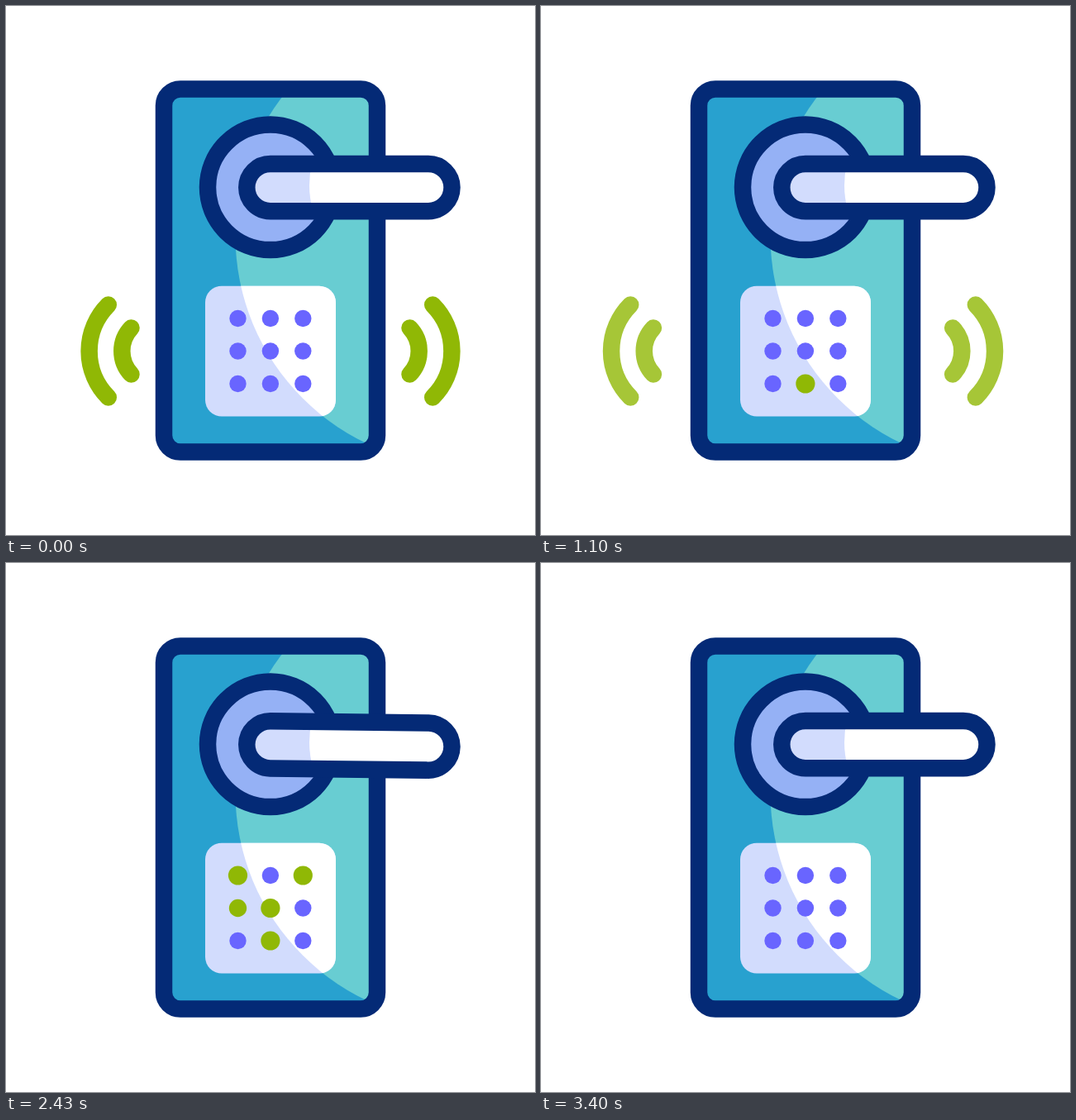
These frames come from a looping animation (640x640 px, 3.43 s). An HTML page:

```html
<!DOCTYPE html>
<html lang="en">
<head>
<meta charset="utf-8">
<title>Smart door lock</title>
<style>
  html, body { margin: 0; width: 100%; height: 100%; overflow: hidden; background: #fff; }
  svg { display: block; width: 100vw; height: 100vh; }
  .line { fill: none; stroke: #042a76; stroke-width: 20.5; }
  .wave { fill: none; stroke: #90b805; stroke-width: 20.5; stroke-linecap: round; }
</style>
</head>
<body>
<svg viewBox="0 0 640 640">
  <defs>
    <clipPath id="plateClip"><rect x="191" y="100.5" width="258" height="439" rx="20"/></clipPath>
    <clipPath id="padClip"><rect x="241" y="338.7" width="158" height="157.8" rx="20"/></clipPath>
    <clipPath id="handleClip"><rect class="turn" x="291.3" y="191" width="248.2" height="57.2" rx="28.6"/></clipPath>
  </defs>

  <g id="left" class="wave">
    <path d="M123.8 361.5A79.2 79.2 0 0 0 123.8 473.5M151.5 389.5A40.6 40.6 0 0 0 151.5 445.5"/>
  </g>
  <g id="right" class="wave">
    <path d="M516.2 361.5A79.2 79.2 0 0 1 516.2 473.5M488.5 389.5A40.6 40.6 0 0 1 488.5 445.5"/>
  </g>

  <g clip-path="url(#plateClip)">
    <rect x="191" y="100" width="258" height="440" fill="#28a1cf"/>
    <circle cx="555.5" cy="278" r="278" fill="#68cdd2"/>
  </g>
  <rect class="line" x="191" y="100.5" width="258" height="439" rx="20"/>

  <g clip-path="url(#padClip)">
    <rect x="241" y="338" width="158" height="160" fill="#d2dcfd"/>
    <circle cx="555.5" cy="278" r="278" fill="#fff"/>
  </g>
  <g id="dots"></g>

  <circle cx="319.8" cy="219.3" r="75.8" fill="#95b1f5"/>
  <circle class="line" cx="319.8" cy="219.3" r="75.8"/>

  <g clip-path="url(#handleClip)">
    <rect x="260" y="150" width="320" height="260" fill="#d2dcfd"/>
    <ellipse cx="627" cy="217" rx="260" ry="169" fill="#fff"/>
  </g>
  <rect class="line turn" x="291.3" y="191" width="248.2" height="57.2" rx="28.6"/>
</svg>
<script>
const LOOP = 3430, FPS = 30;
const PURPLE = [105, 101, 255], GREEN = [144, 184, 5];
const WAVE_STARTS = [0, 25, 51, 77];
const FLASH = [72, 80];
// Key presses: column, row, first lit step, first unlit step
const PRESSES = [[1, 1, 17, 23], [1, 2, 31, 38], [2, 0, 45, 51], [0, 0, 59, 65], [0, 1, 73, 80]];

const byId = id => document.getElementById(id);
const left = byId('left'), right = byId('right');
const turning = document.querySelectorAll('.turn');

const dots = Array.from({ length: 9 }, (_, i) => {
  const dot = document.createElementNS('http://www.w3.org/2000/svg', 'circle');
  dot.setAttribute('cx', 280.5 + 39.4 * (i % 3));
  dot.setAttribute('cy', 378 + 39.5 * Math.floor(i / 3));
  byId('dots').append(dot);
  return dot;
});

const clamp = x => Math.min(1, Math.max(0, x));
const ease = (x, from, to) => {
  const u = clamp((x - from) / (to - from));
  return u * u * (3 - 2 * u);
};
const mix = k => `rgb(${PURPLE.map((c, i) => Math.round(c + (GREEN[i] - c) * k))})`;
const within = (x, [from, to]) => x >= from && x < to;

function drawWaves(step) {
  const age = step - WAVE_STARTS.filter(s => s <= step).pop();
  const push = ease(age, 0, 12);
  left.setAttribute('transform', `translate(${-21 * push} 0)`);
  right.setAttribute('transform', `translate(${13 * push} 0)`);
  for (const side of [left, right]) side.setAttribute('opacity', 1 - ease(age, 6, 13));
}

function drawDots(step) {
  dots.forEach((dot, i) => {
    const press = PRESSES.find(([col, row]) => col + 3 * row === i);
    let tint = 0, grow = 0;
    if (press) {
      const [, , on, off] = press;
      const last = on > FLASH[0];
      if (within(step, [on, off]) || (!last && within(step, FLASH))) tint = grow = 1;
      else if (step === off) tint = grow = 0.12;
      if (last && tint === 1) grow = clamp((step - on + 1) / 3);
    }
    dot.setAttribute('fill', mix(tint));
    dot.setAttribute('r', 10.2 + 1.4 * grow);
  });
}

function drawHandle(step) {
  const angle = 28.8 * (ease(step, 72, 83) - ease(step, 92.5, 102));
  for (const part of turning) part.setAttribute('transform', `rotate(${angle} 303 219.5)`);
}

function draw(ms) {
  // Motion advances in even steps, 30 per second
  const step = Math.min(102, Math.floor((ms % LOOP + 3.5) * FPS / 1000));
  drawWaves(step);
  drawDots(step);
  drawHandle(step);
}

const start = performance.now();
function tick() {
  draw(performance.now() - start);
  requestAnimationFrame(tick);
}
tick();
</script>
</body>
</html>
```
